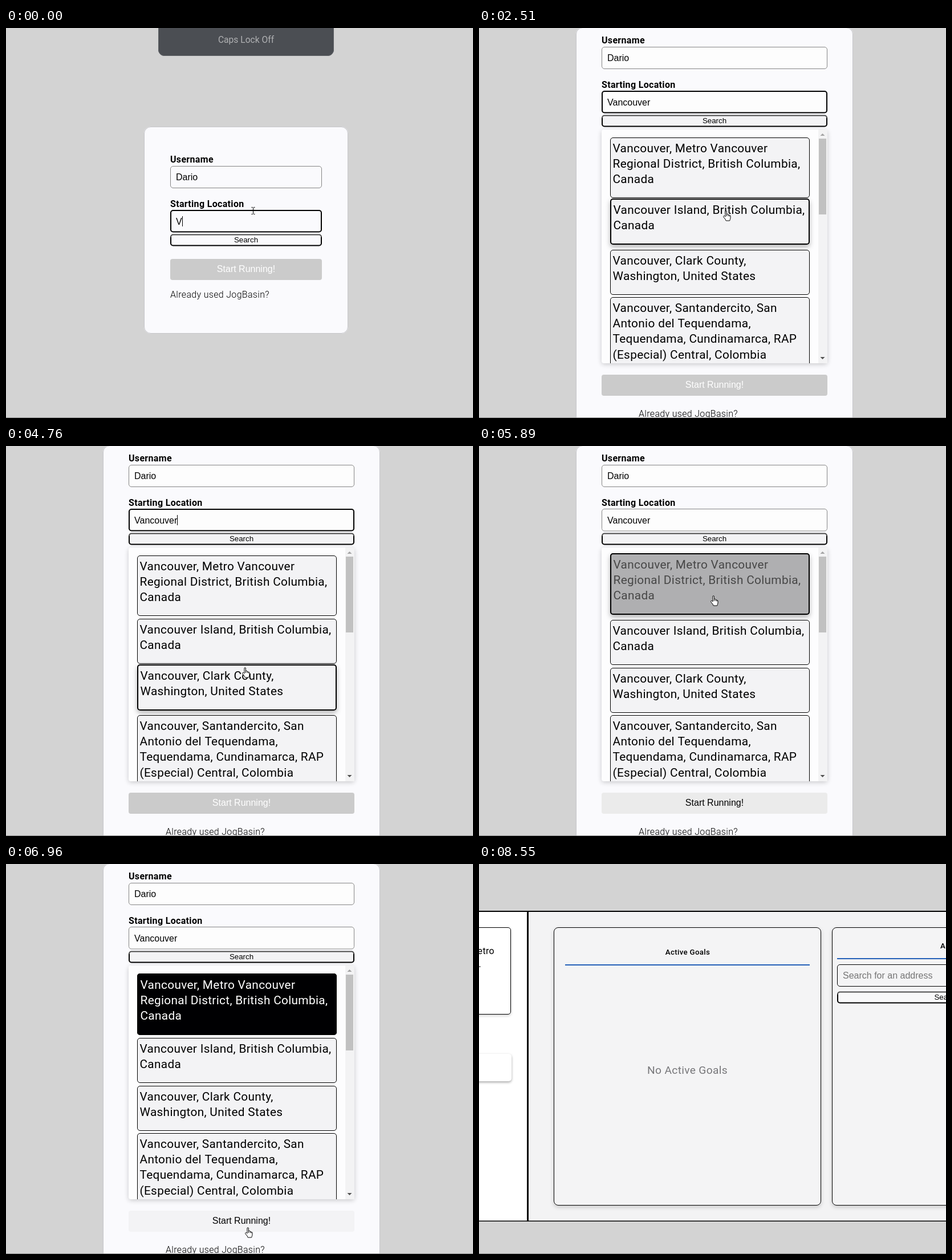
An HTML page with a canvas for the animation above (9230 ms loop, 819 by 684 pixels).

```html
<!DOCTYPE html>
<html lang="en">
<head>
<meta charset="utf-8">
<title>Sign up and pick a location</title>
<style>
html, body { margin: 0; overflow: hidden; background: #d3d3d3; }
canvas { display: block; }
</style>
</head>
<body>
<canvas id="stage" width="819" height="684"></canvas>
<script>
const ctx = document.getElementById('stage').getContext('2d');
const LOOP = 9230, OPEN = 2210, BLUR = 5750, PICK = 5890, DASHBOARD = 7580;
const CITY = 'Vancouver';
const KEYS = [150, 280, 840, 970, 1110, 1240, 1370, 1510];
const BLINKS = [2210, 2660, 3210, 3790, 4330, 4760, 5300];
const RESULTS = [
  ['Vancouver, Metro Vancouver', 'Regional District, British Columbia,', 'Canada'],
  ['Vancouver Island, British Columbia,', 'Canada'],
  ['Vancouver, Clark County,', 'Washington, United States'],
  ['Vancouver, Santandercito, San', 'Antonio del Tequendama,',
   'Tequendama, Cundinamarca, RAP', '(Especial) Central, Colombia']
];
// Pointer positions: time, x, y
const POINTER = [
  [2210, 428, 320], [3210, 430, 305], [3360, 433, 265], [3510, 436, 225], [3660, 437, 238],
  [3790, 436, 262], [3920, 433, 305], [4050, 429, 350], [4180, 425, 388], [4330, 422, 396],
  [4480, 418, 400], [4620, 416, 395], [4760, 414, 388], [4880, 413, 370], [5020, 412, 345],
  [5160, 411, 325], [5300, 411, 316], [5450, 410, 296], [5600, 408, 275], [5750, 406, 262],
  [6430, 407, 310], [6580, 410, 410], [6720, 415, 540], [6840, 418, 615], [6960, 419, 637],
  [7580, 425, 640], [8140, 520, 540], [8280, 640, 390], [8410, 770, 220], [8550, 900, 150]
];
const HAND = new Path2D('M4 10V2Q4 .7 5.2 .7Q6.4 .7 6.4 2V7Q7 6 8.2 6.4Q9.2 6.7 9.2 7.6Q10.6 7 11.2 8.5' +
  'Q13 8.2 13 10V13Q12.8 15 11.6 18H5.2Q4.6 15.5 1 11.8Q.2 10 1.4 9.4Q2.6 9 4 11ZM6.4 7V10M9.2 7.6V10M11.2 8.5V10.5');
const ARROW = new Path2D('M.5 .5V16L4 12.7L6.3 18L8.6 17L6.4 11.9H11.3Z');
const IBEAM = new Path2D('M-3 -6H-1L0 -5L1 -6H3M0 -5V5M-3 6H-1L0 5L1 6H3');

const SANS = '"Liberation Sans", Arial, sans-serif';
const ROBOTO = 'Roboto, sans-serif';

function box(x, y, w, h, r, fill, stroke, line = 1) {
  ctx.beginPath();
  ctx.roundRect(x, y, w, h, r);
  ctx.fillStyle = fill;
  ctx.fill();
  ctx.shadowColor = 'transparent';
  if (!stroke) return;
  ctx.beginPath();
  ctx.roundRect(x + line / 2, y + line / 2, w - line, h - line, Math.max(0, r - line / 2));
  ctx.strokeStyle = stroke;
  ctx.lineWidth = line;
  ctx.stroke();
}

function rect(x, y, w, h, fill) {
  ctx.fillStyle = fill;
  ctx.fillRect(x, y, w, h);
}

function shadow(y, blur, alpha) {
  ctx.shadowColor = `rgba(0,0,0,${alpha})`;
  ctx.shadowOffsetY = y;
  ctx.shadowBlur = blur;
}

function text(str, x, y, font, color = '#000', align = 'left', spacing = 0) {
  ctx.font = font;
  ctx.fillStyle = color;
  ctx.textAlign = align;
  ctx.letterSpacing = spacing + 'px';
  ctx.fillText(str, x, y);
}

const roboto = (str, x, y, size, weight = 400, color = '#000', align = 'left') =>
  text(str, x, y, `${weight} ${size}px ${ROBOTO}`, color, align, 0.32);
const sans = (str, x, y, size, color, align) => text(str, x, y, `${size}px ${SANS}`, color, align);

function searchButton(x, y, w, fill) {
  const edge = ctx.createLinearGradient(0, y, 0, y + 21);
  edge.addColorStop(0.2, '#4c4c4c');
  edge.addColorStop(0.3, '#000');
  box(x, y, w, 21, 5, fill, edge, 2);
  sans('Search', x + w / 2, y + 14.5, 13.33, '#000', 'center');
}

function latest(list, t) {
  return list.filter(step => step[0] <= t).pop();
}

function drawResults(t, pointerY) {
  const hovered = pointerY < 188 || pointerY > 588 ? -1 : [301, 385, 470, 589].findIndex(y => pointerY < y);
  const pick = t < PICK ? 0 : t < 6010 ? 0.28 : t < 6160 ? 0.75 : 1;
  shadow(2, 8, 0.2);
  box(215, 178, 396, 410, 4, '#fdfdfe');
  ctx.save();
  ctx.beginPath();
  ctx.rect(215, 178, 396, 410);
  ctx.clip();
  let top = 192.2;
  RESULTS.forEach((lines, i) => {
    const hot = i === hovered, chosen = i === 0 && pick > 0;
    const border = hot || chosen ? 2 : 1;
    const height = lines.length * 27.3 + 22 + border * 2;
    const y = Math.round(top - (hot ? 4 : 0));
    const shade = chosen ? Math.round(243 * (1 - pick)) : 243;
    const ink = chosen ? Math.round(255 * pick) : 0;
    if (hot) shadow(4, 8, 0.3);
    box(230, y, 350, Math.round(height), 5, `rgb(${shade},${shade},${shade + 2})`, '#000', border);
    lines.forEach((line, n) =>
      roboto(line, 233.5 + border, y + 24.8 + border + n * 27.3, 20.8, 400, `rgb(${ink},${ink},${ink})`));
    top += height + 5;
  });
  rect(595, 178, 16, 410, '#f3f3f4');
  rect(596, 194, 13, 133, '#c1c1c1');
  triangle(602.5, 189, -4, '#a3a3a3');
  triangle(602.5, 577, 4, '#505050');
  ctx.restore();
}

function triangle(x, y, h, fill) {
  ctx.beginPath();
  ctx.moveTo(x - 4, y);
  ctx.lineTo(x + 4, y);
  ctx.lineTo(x, y + h);
  ctx.fillStyle = fill;
  ctx.fill();
}

function drawForm(t, pointerY) {
  const open = t >= OPEN;
  const x = open ? 215 : 288, w = open ? 396 : 266, dy = open ? -209 : 0;
  if (open) box(170, -1, 486, 720, 12, '#fafafd', '#c6c6ca');
  else box(242, 173, 358, 363, 12, '#fafafd', '#c6c6ca');

  const field = open ? '#fdfdfd' : '#fafafd';
  roboto('Username', x, 236 + dy, 16, 700);
  box(x, 242 + dy, w, 39, 5, field, '#858585');
  sans('Dario', x + 10, 267 + dy, 16);

  roboto('Starting Location', x, 314 + dy, 16, 700);
  const focused = t < BLUR;
  box(x, 319 + dy, w, 39.5, 5, field, focused ? '#000' : '#858585', focused ? 2 : 1);
  const typed = CITY.slice(0, 1 + KEYS.filter(k => k <= t).length);
  sans(typed, x + 10, 344.5 + dy, 16);
  const caretOn = BLINKS.filter(b => b <= t).length % 2 === 0;
  if (focused && caretOn) rect(Math.round(x + 10 + ctx.measureText(typed).width), 330 + dy, 1, 18, '#000');

  searchButton(x, 361.5 + dy, w, open ? '#f3f3f5' : '#fafafd');
  if (open) drawResults(t, pointerY);

  const startY = open ? 608 : 405;
  const ready = t >= PICK, over = pointerY > 608;
  box(x, startY, w, 37, 4, !ready ? '#cbcbcb' : over ? '#f3f3f5' : '#ebebeb');
  sans('Start Running!', x + w / 2, startY + 23, 16, ready ? '#000' : '#fff', 'center');
  roboto('Already used JogBasin?', open ? 280 : 288, open ? 682 : 473, 16, 300);
}

function drawDashboard() {
  rect(0, 82, 819, 545, '#000');
  rect(0, 84, 84, 541.5, '#fff');
  rect(87, 84, 732, 541.5, '#f3f3f4');

  shadow(2, 5, 0.2);
  box(-200, 111, 256, 153, 5, '#fff', '#000');
  roboto('Metro', 27, 158, 16, 400, '#000', 'right');
  roboto('.', 4, 181, 16, 400, '#000', 'right');
  shadow(2, 4, 0.35);
  box(-200, 333, 257, 48, 5, '#fff');

  shadow(3, 7, 0.18);
  box(131, 111, 469, 488, 8, '#f4f4f5', '#000');
  roboto('Active Goals', 366, 158.5, 13.3, 500, '#000', 'center');
  rect(151, 176, 429, 2, '#2460b8');
  roboto('No Active Goals', 365.5, 368, 19.2, 400, '#77777a', 'center');

  shadow(3, 7, 0.18);
  box(619, 111, 469, 488, 8, '#f4f4f5', '#000');
  roboto('Address', 809, 148, 13.3, 500);
  rect(628, 165, 200, 2, '#2460b8');
  box(628, 176, 383, 39, 5, '#f4f4f5', '#000');
  sans('Search for an address', 638, 201, 16, '#757575');
  searchButton(628, 223.5, 383, '#f8f8f9');
}

function drawToast(t) {
  ctx.globalAlpha = t < 1370 ? 1 : t < 1510 ? 0.5 : 0;
  box(267, -20, 308, 69, 11, '#4b4e53', '#5f6267');
  text('Caps Lock Off', 421, 26, `400 15.6px ${ROBOTO}`, '#b0b1b3', 'center');
  ctx.globalAlpha = 1;
}

function drawPointer(t, x, y) {
  ctx.save();
  ctx.translate(x, y);
  ctx.lineWidth = 1;
  ctx.strokeStyle = '#000';
  ctx.fillStyle = '#fff';
  const shape = t < OPEN ? IBEAM : t < DASHBOARD ? HAND : ARROW;
  if (shape !== IBEAM) ctx.fill(shape);
  ctx.stroke(shape);
  ctx.restore();
}

function draw(now) {
  const t = now % LOOP;
  const [, x, y] = latest(POINTER, t) || [0, 433.5, 320.5];
  rect(0, 0, 819, 684, '#d3d3d3');
  if (t < DASHBOARD) drawForm(t, y);
  else drawDashboard();
  drawToast(t);
  rect(0, 683, 819, 1, '#8c8c8c');
  drawPointer(t, x, y);
  requestAnimationFrame(draw);
}
requestAnimationFrame(draw);
</script>
</body>
</html>
```
